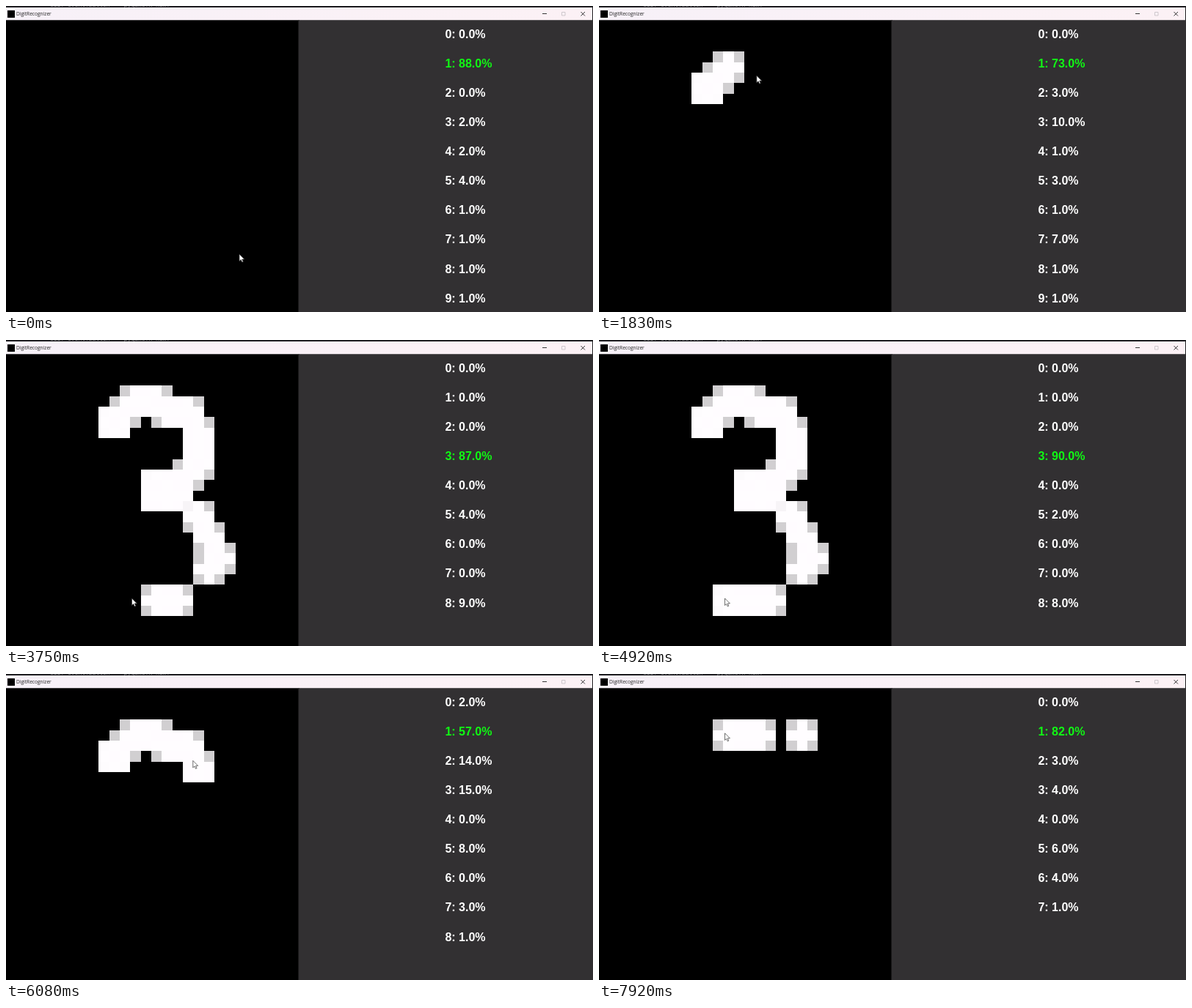
An HTML page with a canvas for the animation above (8000 ms loop, 800 by 418 pixels).

```html
<!DOCTYPE html>
<html lang="en">
<head>
<meta charset="utf-8">
<title>DigitRecognizer</title>
<style>
  html, body { margin: 0; height: 100%; overflow: hidden; background: #000; }
  canvas { display: block; }
</style>
</head>
<body>
<canvas id="stage" width="800" height="418"></canvas>
<script>
const ctx = document.getElementById('stage').getContext('2d');
const board = Object.assign(document.createElement('canvas'), { width: 28, height: 28 }).getContext('2d');
const LOOP = 8000, TICKS_PER_MS = 12 / 1000;
const BOARD_X = -2.6, BOARD_Y = 19.4, CELL_W = 14.33, CELL_H = 14.32;
const ARROW = new Path2D('M0 0V9.6L2.2 7.6 3.7 11 5.3 10.3 3.8 7H6.9Z');

// Strokes are corner points [column, row, dwell]
const THREE = stampsOf([
  [[10, 6, 4], [12, 4], [14, 4], [15, 5], [17, 5], [18, 7], [18, 10], [16, 12], [14, 12, 3],
    [14, 13, 8], [16, 13], [15, 13], [18, 15], [19, 17], [20, 19], [19, 20]],
  [[16, 23], [12, 23, 3]]
]);
const FIVE = stampsOf([[[19, 4]], [[15, 4], [12, 4]]]);

// Predictions in percent for digits 0 to 9, by number of stamps on the board
const EMPTY_ODDS = { stamps: 0, odds: [0, 88, 0, 2, 2, 4, 1, 1, 1, 1] };
const THREE_ODDS = [
  EMPTY_ODDS,
  { stamps: 6, odds: [0, 73, 3, 10, 1, 3, 1, 7, 1, 1] },
  { stamps: 14, odds: [2, 57, 14, 15, 0, 8, 0, 3, 1, 0] },
  { stamps: 20, odds: [0, 27, 21, 43, 0, 1, 0, 4, 4, 0] },
  { stamps: 39, odds: [0, 0, 0, 87, 0, 4, 0, 0, 9, 0] },
  { stamps: THREE.length, odds: [0, 0, 0, 90, 0, 2, 0, 0, 8, 0] }
];
const FIVE_ODDS = [EMPTY_ODDS, { stamps: 5, odds: [0, 82, 3, 4, 0, 6, 4, 1, 0, 0] }];

// Straight and diagonal legs fill every cell; other legs are quick jumps
function stampsOf(strokes) {
  const stamps = [];
  for (const stroke of strokes) {
    let [px, py] = stroke[0];
    for (const [x, y, dwell = 1] of stroke) {
      const dx = x - px, dy = y - py;
      const aligned = !dx || !dy || Math.abs(dx) === Math.abs(dy);
      const steps = aligned ? Math.max(Math.abs(dx), Math.abs(dy)) : 1;
      for (let i = 1; i < steps; i++) stamps.push([px + dx * i / steps, py + dy * i / steps]);
      for (let i = 0; i < dwell; i++) stamps.push([x, y]);
      [px, py] = [x, y];
    }
  }
  return stamps;
}

const clamp = (v, min, max) => Math.min(max, Math.max(min, v));
const mix = (a, b, f) => a.map((v, i) => v + (b[i] - v) * f);
const ease = f => f * f * (3 - 2 * f);

function oddsFor(readings, count) {
  const i = clamp(readings.findIndex(r => r.stamps >= count), 1, readings.length - 1);
  const a = readings[i - 1], b = readings[i];
  return mix(a.odds, b.odds, (count - a.stamps) / (b.stamps - a.stamps));
}

// Pointer position while working on the given (fractional) stamp
function pointerAt(stamps, count) {
  const at = clamp(count - 1, 0, stamps.length - 1), i = Math.floor(at);
  const [col, row] = mix(stamps[i], stamps[Math.min(i + 1, stamps.length - 1)], at - i);
  return [BOARD_X + CELL_W * (col + 0.5) - 5, BOARD_Y + CELL_H * (row + 0.5) - 3];
}

function rect(color, x, y, w, h) {
  ctx.fillStyle = color;
  ctx.fillRect(x, y, w, h);
}

function text(str, x, y, font, color) {
  ctx.font = font;
  ctx.fillStyle = color;
  ctx.fillText(str, x, y);
}

function line(color, path) {
  ctx.strokeStyle = color;
  ctx.lineWidth = 0.9;
  ctx.stroke(new Path2D(path));
}

function drawWindow() {
  rect('#1f1f22', 0, 0, 800, 418);
  text('elif event.button == pygame.K_num:', 60, 1.4, '8px "Noto Sans Mono", monospace', '#85858a');
  const bar = ctx.createLinearGradient(0, 0, 800, 0);
  bar.addColorStop(0, '#f7f1f8');
  bar.addColorStop(1, '#fcf1f5');
  rect(bar, 0, 2, 799, 17.5);
  rect('#000', 2, 6, 10, 10);
  text('DigitRecognizer', 14, 13.2, '6.6px "Open Sans", sans-serif', '#222');
  line('#222', 'M731 10.5h6M783.5 8l5.5 5.5M789 8l-5.5 5.5');
  line('#c9c3c9', 'M757.5 8.5h4.5v4.5h-4.5z');
  rect('#000', 0, 19.5, 400, 399);
}

// The brush is a solid plus with softer corners
function paint([col, row]) {
  board.fillStyle = '#fffdff';
  board.globalAlpha = 0.82;
  board.fillRect(col - 1, row - 1, 3, 3);
  board.globalAlpha = 1;
  board.fillRect(col - 1, row, 3, 1);
  board.fillRect(col, row - 1, 1, 3);
}

const erase = ([col, row]) => board.clearRect(col - 1, row - 1, 3, 3);

function drawBoard(painted, erased) {
  board.clearRect(0, 0, 28, 28);
  painted.forEach(paint);
  erased.forEach(erase);
  ctx.imageSmoothingEnabled = false;
  ctx.drawImage(board.canvas, BOARD_X, BOARD_Y, 28 * CELL_W, 28 * CELL_H);
}

// Rows stop once the percentages add up to 100
function drawOdds(odds) {
  const best = Math.max(...odds);
  let sum = 0;
  rect('#323032', 398.5, 19.5, 401.5, 399);
  odds.forEach((p, digit) => {
    if (sum < 99.5)
      text(`${digit}: ${Math.round(p).toFixed(1)}%`, 598.4, 43.7 + 40.1 * digit,
        'bold 16px "Liberation Sans", Arial, sans-serif', p === best ? '#10fa14' : '#fff');
    sum += p;
  });
}

function drawPointer([x, y]) {
  ctx.save();
  ctx.translate(x, y);
  ctx.fillStyle = '#fff';
  ctx.fill(ARROW);
  ctx.strokeStyle = '#333';
  ctx.lineWidth = 0.7;
  ctx.stroke(ARROW);
  ctx.restore();
}

// The three is drawn, then wiped along the same path; the five follows
function sceneAt(tick) {
  const home = pointerAt(THREE, 1), total = THREE.length;
  if (tick >= 86) {
    const count = clamp(tick - 90, 0, FIVE.length);
    const pointer = count ? pointerAt(FIVE, count)
      : mix(home, pointerAt(FIVE, 1), ease((tick - 86) / 5));
    return { painted: FIVE.slice(0, count), erased: [], odds: oddsFor(FIVE_ODDS, count), pointer };
  }
  const drawn = clamp((tick - 17.8) * 1.435, 0, total);
  const wiped = clamp((tick - 59.1) * 2.1, 0, total);
  const painted = THREE.slice(0, Math.floor(drawn));
  const erased = THREE.slice(total - Math.floor(wiped));
  // The pointer runs ahead of the brush
  const pointer = tick < 9 ? mix([318, 339], home, ease(tick / 9))
    : pointerAt(THREE, wiped ? total - wiped - 2 : drawn && drawn + 3);
  return { painted, erased, odds: oddsFor(THREE_ODDS, painted.length - erased.length), pointer };
}

function draw(ms) {
  const scene = sceneAt(Math.floor((ms + 4) % LOOP * TICKS_PER_MS));
  drawWindow();
  drawBoard(scene.painted, scene.erased);
  drawOdds(scene.odds);
  drawPointer(scene.pointer);
}

let start;
function loop(now) {
  start ??= now;
  draw(now - start);
  requestAnimationFrame(loop);
}
draw(0);
requestAnimationFrame(loop);
</script>
</body>
</html>
```
